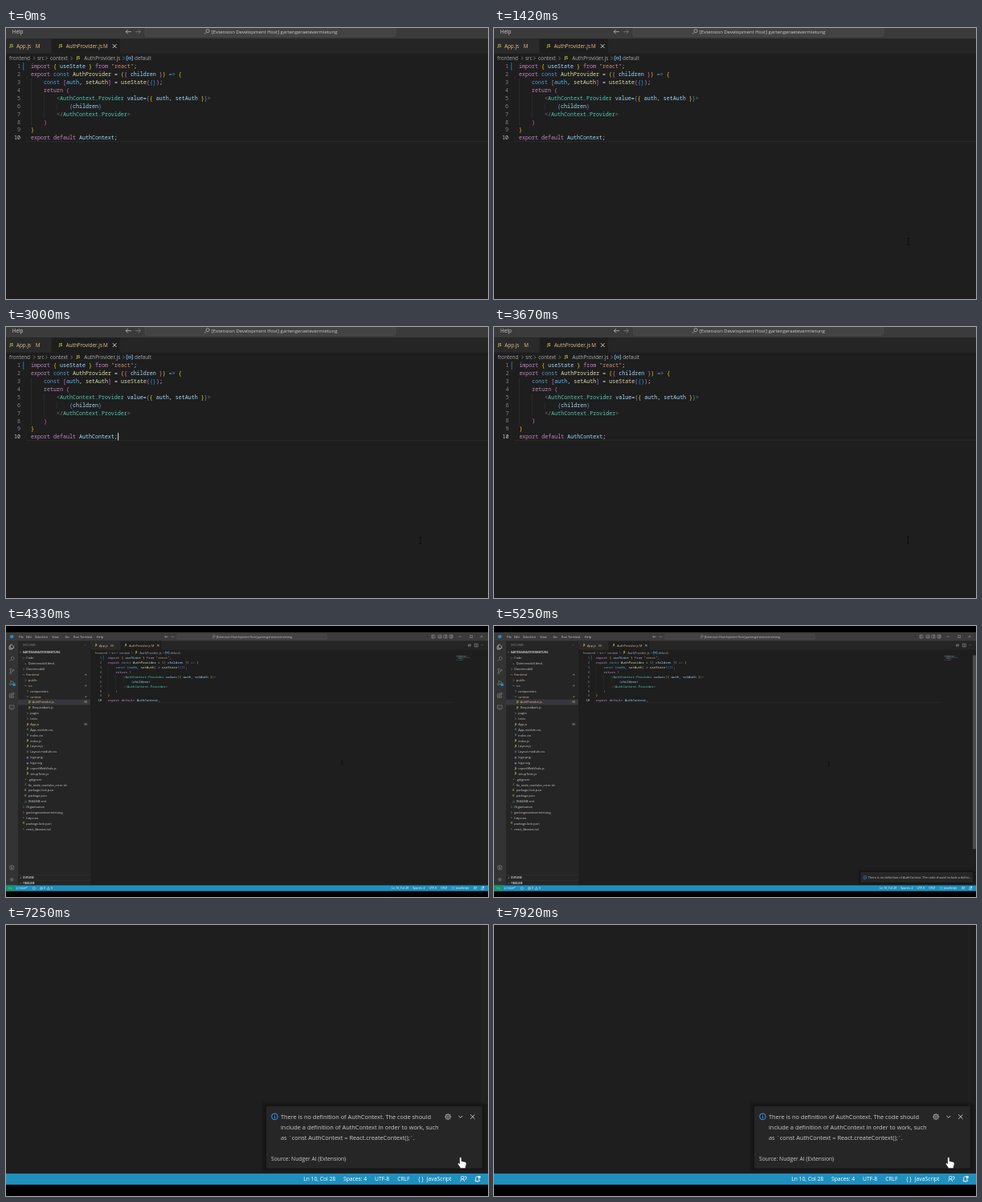
Write an HTML page that moves like this. It is 600 by 338 pixels and loops after 8000 ms.

```html
<!DOCTYPE html>
<html lang="en">
<head>
<meta charset="utf-8">
<title>Editor walkthrough</title>
<style>
  html, body { margin: 0; width: 100%; height: 100%; overflow: hidden; background: #000; }
  svg { display: block; width: 100vw; height: 100vh; }
  text { font-family: "Open Sans", "Noto Sans", sans-serif; white-space: pre; }
  .mono { font-family: "Noto Sans Mono", "DejaVu Sans Mono", monospace; font-weight: 500; }
  .bold { font-weight: 700; }
</style>
</head>
<body>
<svg id="stage" viewBox="0 0 600 338" preserveAspectRatio="none"></svg>
<script>
const LOOP = 8000;
const PROJECT = 'gartengeraetevermietung';
const GOLD = '#e2c08d', GREY = '#b4b4b4', LIGHT = '#cccccc', WHITE = '#fff', JS = '#cbcb41', BLUE = '#3794ff';
const DIM = '#8a8a8a';
const CHAR = 7.7, LINE = 19, CODE_X = 405.8, CODE_Y = 126.5;

function el(parent, tag, attrs, content) {
  const node = document.createElementNS('http://www.w3.org/2000/svg', tag);
  for (const key in attrs) node.setAttribute(key, attrs[key]);
  if (content !== undefined) node.textContent = content;
  parent.appendChild(node);
  return node;
}
const group = parent => el(parent, 'g', {});
const rect = (p, x, y, w, h, fill, more) =>
  el(p, 'rect', { x, y, width: w, height: h, fill, ...more });
// text centred on y; size is a nominal UI size
const label = (p, x, y, str, fill = LIGHT, size = 13, more) =>
  el(p, 'text', { x, y: y + size * 0.34, fill, 'font-size': size * 0.94, ...more }, str);
const icon = (p, x, y, d, stroke = LIGHT, width = 1.2) =>
  el(p, 'path', { d, transform: `translate(${x} ${y})`, fill: 'none', stroke, 'stroke-width': width });
const show = (node, on) => node.setAttribute('display', on ? 'inline' : 'none');

const ring = r => `M${-r} 0a${r} ${r} 0 1 0 ${2 * r} 0a${r} ${r} 0 1 0 ${-2 * r} 0`;
const box = (w, h) => `M${-w / 2} ${-h / 2}h${w}v${h}h${-w}z`;
const RIGHT = 'M-2 -4L2 0L-2 4', DOWN = 'M-4 -2L0 2L4 -2', UP = 'M-4 2L0 -2L4 2';
const CROSS = 'M-4.5 -4.5L4.5 4.5M4.5 -4.5L-4.5 4.5';
const LENS = 'M-1 1L-6 6M-2 -2a4 4 0 1 0 8 0a4 4 0 1 0 -8 0';
const GEAR = ring(2) + ring(5) + 'M0 -7v2M0 5v2M-7 0h2M5 0h2M-5 -5l1.5 1.5M5 5l-1.5 -1.5M5 -5l-1.5 1.5M-5 5l1.5 -1.5';
const BELL = 'M-5 4h10l-1.5 -2v-4a3.5 3.5 0 0 0 -7 0v4zM-1 6h2';

const stage = document.getElementById('stage');
const cam = group(stage);
rect(cam, 0, 25, 1920, 1033, '#1e1e1e');

// title bar
rect(cam, 0, 25, 1920, 35, '#3b3b3b');
el(cam, 'circle', { cx: 23, cy: 42, r: 7, fill: '#2489ca' });
[['File', 51], ['Edit', 80], ['Selection', 115], ['View', 183], ['Go', 235], ['Run', 269],
 ['Terminal', 294], ['Help', 361]].forEach(([s, x]) => label(cam, x, 43.3, s));
const search = group(cam);
icon(search, 639, 43, 'M7 0H-6M-1 -5L-6 0L-1 5', LIGHT, 1.4);
icon(search, 662, 43, 'M-6 0H6M1 -5L6 0L1 5', '#858585', 1.4);
rect(search, 679, 32, 600, 22, '#434343', { rx: 6, stroke: '#555' });
icon(search, 827, 43, LENS);
label(search, 838, 43.3, '[Extension Development Host] ' + PROJECT, LIGHT, 12.2);
[1702, 1728, 1750, 1773].forEach((x, i) =>
  icon(cam, x, 42, box(13, 12) + ['M-2 -6v12', 'M-6 2h12', 'M2 -6v12', 'M0 -6v12M0 0h6'][i]));
icon(cam, 1808, 42, 'M-5 0H5');
icon(cam, 1853, 42, box(9, 9));
icon(cam, 1894, 42, CROSS);

// activity bar
rect(cam, 0, 60, 48, 976, '#333333');
[['M-6 -9h8l5 5v9h-13zM-6 -4h-4v13h11v-4', '#ddd'],
 ['M-2 2L-9 9M-3 -3a6 6 0 1 0 12 0a6 6 0 1 0 -12 0'],
 ['M-5 -4v9M-8 -7a3 3 0 1 0 6 0a3 3 0 1 0 -6 0M-8 8a3 3 0 1 0 6 0a3 3 0 1 0 -6 0M3 -4a3 3 0 1 0 6 0a3 3 0 1 0 -6 0M6 -1q0 4 -11 4'],
 ['M-4 -2v-8l13 8l-10 7M-9 4a4 4 0 1 0 8 0a4 4 0 1 0 -8 0'],
 ['M-9 -5h8v8h8v7h-16zM-9 3h8v7M2 -9h7v7h-7z'],
 ['M-9 -7h18v12h-18zM-5 9h10']
].forEach(([d, c], i) => icon(cam, 23, 84 + 48 * i, d, c || DIM, 1.8));
el(cam, 'circle', { cx: 32, cy: 234, r: 6, fill: '#1b8fd0' });
icon(cam, 23, 964, ring(9) + 'M-3 -2a3 3 0 1 0 6 0a3 3 0 1 0 -6 0M-6 7q6 -8 12 0', DIM, 1.8);
icon(cam, 23, 1012, GEAR, DIM, 1.6);

// explorer
rect(cam, 48, 60, 289, 976, '#252526');
label(cam, 67, 77, 'EXPLORER', '#8f8f8f', 11);
label(cam, 311, 75, '···', '#aaa', 13);
icon(cam, 58, 104, DOWN);
label(cam, 67, 104, PROJECT.toUpperCase(), LIGHT, 10.6, { class: 'bold' });
rect(cam, 48, 293, 288, 22, '#37373d');

const MARKS = {
  js: ['JS', JS], css: ['#', '#519aba'], json: ['{}', JS], png: ['▣', '#a074c4'], svg: ['▣', '#a074c4'],
  sh: ['$', '#4d9a5a'], md: ['ⓘ', '#519aba'], txt: ['≡', GREY], dmd: ['≡', GREY], gitignore: ['●', '#6d8086']
};
// depth, sign (> closed, v open, - file), name
`0vCode|1-Datenmodell.dmd|0>Datenmodell|0vfrontend|1>public|1vsrc|2>components|2vcontext|3-AuthProvider.js
3-RequireAuth.js|2>pages|2>tests|2-App.js|2-App.module.css|2-index.css|2-index.js|2-Layout.js|2-Layout.module.css
2-logo.png|2-logo.svg|2-reportWebVitals.js|2-setupTests.js|1-.gitignore|1-fix_node_modules_error.sh
1-package-lock.json|1-package.json|1-README.md|0>Organisation|0>${PROJECT}|0-https.txt|0-package-lock.json
0-react_libraries.txt`.split(/[|\n]/).forEach((row, i) => {
  const shift = 8 * row[0], name = row.slice(2), y = 128 + 22 * i;
  const folder = /^(frontend|src|context)$/.test(name), file = /^(AuthProvider|App)\.js$/.test(name);
  if (row[1] === '-') {
    const [mark, color] = MARKS[name.split('.').pop()];
    label(cam, 70 + shift, y, mark, color, 9.5, { class: 'bold', 'text-anchor': 'middle' });
  } else icon(cam, 70 + shift, y, row[1] === 'v' ? DOWN : RIGHT);
  label(cam, 81 + shift, y, name, folder || file ? GOLD : LIGHT);
  if (folder) el(cam, 'circle', { cx: 318, cy: y, r: 3, fill: '#8d7a5a' });
  if (file) label(cam, 312, y, 'M', GOLD, 12);
});
['OUTLINE', 'TIMELINE'].forEach((s, i) => {
  rect(cam, 48, 993 + 22 * i, 288, 1, '#3a3a3b');
  icon(cam, 58, 1005 + 22 * i, RIGHT);
  label(cam, 67, 1005 + 22 * i, s, LIGHT, 10.6, { class: 'bold' });
});

// tabs and breadcrumbs
const jsMark = (x, y) => label(cam, x, y, 'JS', JS, 10, { class: 'bold', 'text-anchor': 'middle' });
rect(cam, 337, 60, 1583, 35, '#252526');
rect(cam, 337, 60, 118, 35, '#2a2a2a');
rect(cam, 456, 60, 163, 35, '#1e1e1e');
[[359, 'App.js', 371, 417], [477, 'AuthProvider.js', 490, 579]].forEach(([j, s, x, m]) => {
  jsMark(j, 77.5);
  label(cam, x, 77.5, s, GOLD);
  label(cam, m, 77.5, 'M', GOLD, 13);
});
icon(cam, 606, 77.5, CROSS, '#eee', 1.6);
icon(cam, 1846, 77, 'M-5 -5v8h6M5 5v-8h-6M-2 0l3 3l-3 3M2 -6l-3 3l3 3');
icon(cam, 1873, 77, box(13, 12) + 'M0 -6v12');
label(cam, 1892, 75, '···');
[['frontend', 354], ['src', 421], ['context', 452], ['AuthProvider.js', 533], ['default', 654]]
  .forEach(([s, x]) => label(cam, x, 106, s, '#a9a9a9'));
[413.5, 443, 503, 628].forEach(x => icon(cam, x, 106.5, RIGHT, '#999'));
jsMark(519, 106);
icon(cam, 642, 106.5, 'M-4 -5h-3v10h3M4 -5h3v10h-3M-3 -2h6v4h-6z', '#75beff', 1.4);

// code
const INK = { p: '#c586c0', y: '#ffd700', o: '#da70d6', k: '#179fff', b: '#569cd6', v: '#9cdcfe',
  c: '#4fc1ff', f: '#dcdcaa', s: '#ce9178', t: '#4ec9b0', g: '#808080', w: '#d4d4d4' };
const CODE = [
  'pimport ~y{ ~vuseState ~y}~p from ~s"react"~w;',
  'pexport ~bconst ~fAuthProvider ~w= ~y(~o{ ~vchildren ~o}~y) ~b=> ~y{',
  'w    ~bconst ~o[~cauth~w, ~fsetAuth~o] ~w= ~fuseState~o(~k{}~o)~w;',
  'w    ~preturn ~o(',
  'w        ~g<~tAuthContext.Provider ~vvalue~w=~b{~y{ ~vauth~w, ~vsetAuth ~y}~b}~g>',
  'w            ~b{~vchildren~b}',
  'w        ~g</~tAuthContext.Provider~g>',
  'w    ~o)',
  'y}',
  'pexport default ~vAuthContext~w;'
];
[[0, 2, 6], [4, 4, 3], [8, 5, 1]].forEach(([col, row, n]) =>
  rect(cam, CODE_X + col * CHAR, 117 + row * LINE, 1, n * LINE, '#343434'));
rect(cam, 393, 305, 1390, 2, '#292929');
rect(cam, 387, 117, 2, LINE, '#1f7394');
CODE.forEach((src, i) => {
  const y = CODE_Y + i * LINE + 4.5;
  const mono = { y, class: 'mono', 'font-size': CHAR / 0.6 };
  el(cam, 'text', { x: 381, fill: i === 9 ? '#c6c6c6' : '#858585', 'text-anchor': 'end', ...mono }, i + 1);
  const line = el(cam, 'text', { x: CODE_X, ...mono });
  let col = 0;
  src.split('~').forEach(tok => {
    const str = tok.slice(1), fill = INK[tok[0]];
    el(line, 'tspan', { fill }, str);
    if (str.trim()) rect(cam, 1793 + col, 118 + i * 2, str.trim().length, 1.3, fill, { opacity: 0.55 });
    col += str.length;
  });
});
const caret = rect(cam, CODE_X + 27 * CHAR, 288, 2, 18, '#d8d8d8');
rect(cam, 1906, 117, 1, 919, '#2a2a2a');
const thumb = rect(cam, 1907, 117, 13, 773, '#4b4b4b');

// status bar
rect(cam, 0, 1035, 1920, 23, '#1f8fbe');
rect(cam, 0, 1035, 35, 23, '#16926f');
icon(cam, 17, 1046.5, 'M-6 -4l4 3l-4 3M6 -2l-4 3l4 3', WHITE);
icon(cam, 46, 1046.5, 'M-3 -5v10M3 -4v2q0 3 -6 3', WHITE);
icon(cam, 111, 1046.5, ring(5), WHITE);
icon(cam, 141, 1046.5, ring(5) + 'M-2 -2l4 4M2 -2l-4 4', WHITE);
icon(cam, 169, 1046.5, 'M-5 4L0 -5L5 4z', WHITE);
[['main*', 53], ['0', 150], ['0', 179], ['Ln 10, Col 28', 1537], ['Spaces: 4', 1620], ['UTF-8', 1685],
 ['CRLF', 1732], ['{ }', 1775], ['JavaScript', 1793]].forEach(([s, x]) => label(cam, x, 1046.5, s, WHITE, 12));
icon(cam, 1868, 1046.5, 'M-5 5q0 -5 4 -5q4 0 4 5M-4 -3a3 3 0 1 0 6 0a3 3 0 1 0 -6 0M3 -5h4v5h-2l-2 2', WHITE);
icon(cam, 1898, 1046.5, BELL, WHITE, 1.4);
el(cam, 'circle', { cx: 1902, cy: 1042, r: 2.5, fill: WHITE });

// command palette
const palette = group(cam);
for (let i = 4; i > 0; i--)
  rect(palette, 658 - i * 2, 28, 599 + i * 4, 436 + i * 2, '#000', { opacity: 0.08, rx: 6 });
rect(palette, 658, 27, 599, 437, '#222223', { rx: 6 });
rect(palette, 665, 33, 586, 25, '#333334', { stroke: '#1c6f9c' });
rect(palette, 664, 65.5, 592, 22, '#083c56', { rx: 2 });
rect(palette, 664, 109, 587, 1, '#3a3a3b');
const typed = label(palette, 672, 45.5, '>');
const rows = `What's wrong|Developer Reload Window|Accept Next Word Of Inline Suggestion|Add Browser Breakpoint
Add Cursor Below|Velmo Packages Inventory: View Logs|Velmo Packages Inventory: View Properties
Calls: Show Call Hierarchy|Calls: Show Incoming Calls|Calls: Show Outgoing Calls|Close Window
Drift Folders: Show Drift Folders|Drift Folders: Store Working Changes in Drift|Code: Show Release Notes
Configure Recommended Extensions (Workspace Folder)|Continue Working On...|Copy Line Down
Copy With Syntax Highlighting`.split(/[|\n]/);
const rowY = i => 76.5 + 22 * i;
const hits = rows.map((s, i) => {
  const line = label(palette, 674, rowY(i), '', i ? LIGHT : WHITE);
  const at = s.search(/w/i);
  el(line, 'tspan', {}, s.slice(0, at));
  const hit = el(line, 'tspan', {}, s[at]);
  el(line, 'tspan', {}, s.slice(at + 1));
  return hit;
});
function keys(i, names, right) {
  names.split(' ').reverse().forEach((name, n) => {
    if (n) {
      label(palette, right - 7, rowY(i), '+', LIGHT, 11, { 'text-anchor': 'middle' });
      right -= 14;
    }
    const w = name.length * 6 + 11;
    rect(palette, right - w, rowY(i) - 8, w, 16, i ? '#343435' : '#14475f', { rx: 3 });
    label(palette, right - w / 2, rowY(i), name, LIGHT, 11, { 'text-anchor': 'middle' });
    right -= w;
  });
}
keys(0, 'Ctrl Space', 1126);
[[1, 'Ctrl R'], [4, 'Ctrl Alt DownArrow'], [7, 'Shift Alt H'], [10, 'Alt F4'], [16, 'Shift Alt DownArrow']]
  .forEach(([i, names]) => keys(i, names, 1232));
label(palette, 1133, rowY(0), 'recently used', '#e4e4e4', 12.5);
icon(palette, 1225, rowY(0), GEAR, '#eee');
label(palette, 1234, rowY(2), 'other commands', BLUE, 12.5, { 'text-anchor': 'end' });

// notification
const note = group(cam);
function card(top, lines) {
  const g = group(note), y = top + 21.5;
  for (let i = 5; i > 0; i--)
    rect(g, 1460 - i * 2, top - i * 2, 448 + i * 4, 1023 - top + i * 4, '#000', { opacity: 0.07, rx: 5 });
  rect(g, 1460, top, 448, 1024 - top, '#262627', { rx: 3 });
  icon(g, 1477.5, y, ring(6.5) + 'M0 -1v5M0 -4v1.6', BLUE, 1.6);
  lines.forEach((s, i) => label(g, 1490, y + 22 * i, s, LIGHT, 13.1));
  return g;
}
function buttons(g, y, arrow) {
  icon(g, 1837, y, GEAR);
  icon(g, 1863, y, arrow, LIGHT, 1.5);
  icon(g, 1888, y, CROSS, LIGHT, 1.5);
}
const START = 'There is no definition of AuthContext. The code should';
const plain = card(982, [START + ' include a defini...']);
const hover = card(982, [START + '...']);
buttons(hover, 1003, UP);
const open = card(895, [START, 'include a definition of AuthContext in order to work, such',
  'as `const AuthContext = React.createContext();`.']);
buttons(open, 917, DOWN);
label(open, 1470, 1005, 'Source: Nudger AI (Extension)', LIGHT, 12);

// pointers
const beam = icon(cam, 0, 0, 'M-3 -8q3 0 3 2v12q0 2 -3 2M3 -8q-3 0 -3 2M3 8q-3 0 -3 -2', '#080808', 1.5);
const solid = d => el(cam, 'path', { d, fill: WHITE, stroke: '#111', 'stroke-width': 1 });
const arrow = solid('M0 0v16l4 -4l3 7l3 -1l-3 -7h5z');
const hand = solid('M-2 0q2 -2 4 0v7l8 2q3 1 2 5l-2 8h-10l-6 -9q0 -3 3 -2l1 2z');

// time
const clamp = x => Math.max(0, Math.min(1, x));
const span = (t, a, b) => clamp((t - a) / (b - a));
const ease = x => x < 0.5 ? 4 * x ** 3 : 1 - (2 - 2 * x) ** 3 / 2;
const mix = (a, b, k) => a + (b - a) * k;
const CODE_VIEW = [0.52, -180, -17.7], FULL = [0.3125, 0, 0], CORNER = [0.6, -552, -311];
const OPEN = 1670, TYPE = 2250, CLOSE = 2750, NOTE = 4900, CLICK = 7200;

function draw(t) {
  const out = ease(span(t, 3600, 4320)), into = ease(span(t, 5280, 6130));
  const [s, x, y] = CODE_VIEW.map((v, i) => mix(mix(v, FULL[i], out), CORNER[i], into));
  cam.setAttribute('transform', `translate(${x} ${y}) scale(${s})`);

  const listed = t >= OPEN && t < CLOSE, hit = t >= TYPE;
  show(palette, listed);
  show(search, !listed);
  typed.textContent = hit ? '>w' : '>';
  hits.forEach(h => h.setAttribute('style', hit ? 'fill: #2aaaff; font-weight: 700' : ''));
  show(caret, t < OPEN ? t >= 540 && t < 980 : t >= CLOSE && Math.floor((t - CLOSE) / 500) % 2 === 0);

  const go = ease(span(t, 6380, 6900));
  const mx = mix(t < 4500 ? 1338 : 1334, 1863, go), my = mix(t < 4500 ? 546 : 551, 1002, go);
  const inside = my > 982, onButton = go > 0.99;
  [beam, arrow, hand].forEach(p => p.setAttribute('transform', `translate(${mx} ${my})`));
  beam.setAttribute('opacity', span(t, 100, 1300));
  show(beam, !inside);
  show(arrow, inside && !onButton);
  show(hand, onButton);
  thumb.setAttribute('opacity', span(t, 4600, 5000) * (1 - span(t, 6700, 7300)));

  const rise = 1 - (1 - span(t, NOTE, NOTE + 250)) ** 3;
  note.setAttribute('transform', `translate(0 ${(1 - rise) * 40})`);
  note.setAttribute('opacity', rise);
  show(plain, !inside);
  show(hover, inside && t < CLICK);
  show(open, t >= CLICK);
}

const begin = performance.now();
function tick() {
  draw((performance.now() - begin) % LOOP);
  requestAnimationFrame(tick);
}
tick();
</script>
</body>
</html>
```
